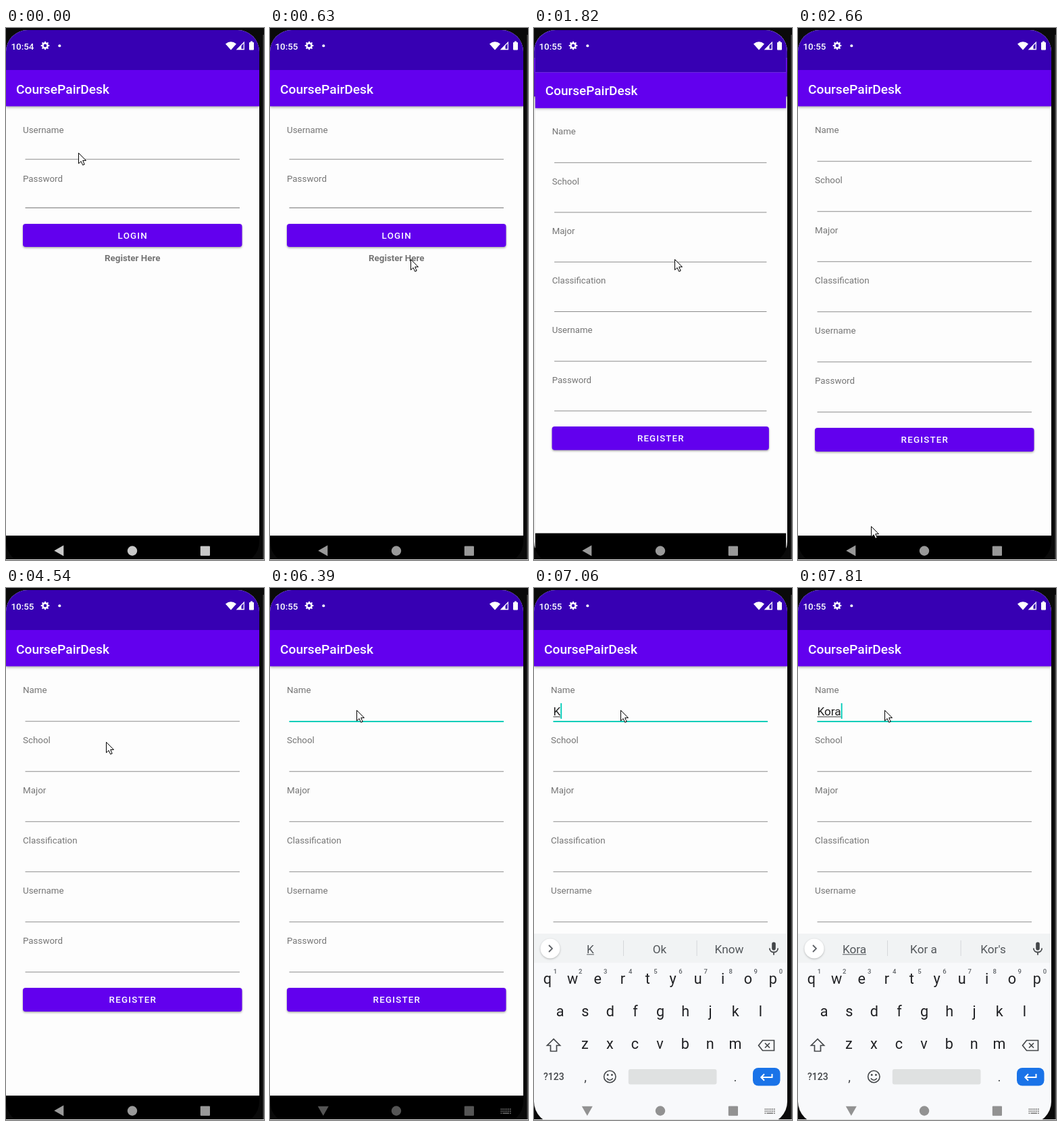
Write an HTML page with a canvas that moves like this. It is 382x785 px and loops after 8000 ms.

```html
<!DOCTYPE html>
<html lang="en">
<head>
<meta charset="utf-8">
<title>Sign-up screen</title>
<style>
html, body { margin: 0; width: 100%; height: 100%; overflow: hidden; background: #000; }
canvas { display: block; width: 382px; height: 785px; }
</style>
</head>
<body>
<canvas id="stage"></canvas>
<script>
const W = 382, H = 785, LOOP = 8000, TEAL = '#03cdb9', GREY = '#757575';
const dpr = window.devicePixelRatio || 1;

function setUp(canvas) {
  canvas.width = W * dpr;
  canvas.height = H * dpr;
  return canvas.getContext('2d');
}
const main = setUp(document.getElementById('stage'));
const layer = setUp(document.createElement('canvas'));
let c = main; // context the helpers draw on

// Stepped tracks: [time, ...values]; the last entry reached is in force.
const POINTER = [
  [0, 107.5, 184], [120, 116, 196], [240, 146, 243], [360, 184, 299], [480, 202, 324],
  [630, 208.5, 341], [1970, 209, 359], [2130, 226, 492], [2250, 240, 607],
  [2400, 239, 634], [2520, 237, 651], [2660, 108.5, 735], [2810, 82, 739],
  [3110, 78, 744], [3230, 73, 757], [3360, 69, 770], [3480, 67, 779],
  [3740, 72, 779], [3880, 77, 774], [4030, 104, 690], [4150, 160, 500],
  [4270, 202, 354], [4540, 148.5, 227], [4690, 122, 165], [4810, 114, 141], [4960, 128.5, 180]
];
const NAV = [[0, '#c8c8c8'], [240, '#b0b0b0'], [480, '#999'], [5960, '#707070'],
  [6390, '#555'], [6640, '#666'], [6790, '#929292']];
const TYPED = [[0, ''], [6640, 'K'], [7310, 'Ko'], [7430, 'Kor'], [7550, 'Kora']];
const HINTS = [[0], [6940, 'K', 'Ok', 'Know'], [7430, 'Ko', 'Know', 'Koi'],
  [7550, 'Kor', 'Kor a', 'For'], [7810, 'Kora', 'Kor a', "Kor's"]];
const BOARD = [[0, 0, 0], [6520, 0.4, 36], [6640, 0.8, 16], [6790, 1, 0]];
const at = (track, t) => track.filter(k => k[0] <= t).pop().slice(1);

function rect(x, y, w, h, color, r = 0) {
  c.fillStyle = color;
  c.beginPath();
  c.roundRect(x, y, w, h, r);
  c.fill();
}

function disc(x, y, r, color) {
  c.fillStyle = color;
  c.beginPath();
  c.arc(x, y, r, 0, 7);
  c.fill();
}

function poly(points, color) {
  c.fillStyle = color;
  c.beginPath();
  for (let i = 0; i < points.length; i += 2) c.lineTo(points[i], points[i + 1]);
  c.closePath();
  c.fill();
}

function line(path, color, width = 1.8) {
  c.strokeStyle = color;
  c.lineWidth = width;
  c.stroke(new Path2D(path));
}

function text(str, x, y, size, color, { weight = 400, align = 'left', gap = 0 } = {}) {
  c.font = `${weight} ${size}px Roboto, sans-serif`;
  c.textAlign = align;
  c.letterSpacing = gap + 'px';
  c.fillStyle = color;
  c.fillText(str, x, y);
  return c.measureText(str).width;
}

function shadowed(draw, blur, dy, alpha) {
  c.save();
  c.shadowColor = `rgba(0,0,0,${alpha})`;
  c.shadowBlur = blur * dpr;
  c.shadowOffsetY = dy * dpr;
  draw();
  c.restore();
}

function gear(x, y, r, color) {
  c.fillStyle = color;
  c.beginPath();
  for (let i = 0; i < 32; i++) {
    const a = (i - 0.5) * Math.PI / 16, q = i % 4 < 2 ? r : r * 0.74;
    c.lineTo(x + q * Math.cos(a), y + q * Math.sin(a));
  }
  c.closePath();
  c.moveTo(x + r * 0.36, y);
  c.arc(x, y, r * 0.36, 0, 7);
  c.fill('evenodd');
}

function field(label, y, lineY, focused) {
  text(label, 25, y, 13.37, GREY);
  if (focused) rect(28.5, lineY - 0.2, 317.5, 1.9, TEAL);
  else rect(28.5, lineY, 317.5, 1.1, '#8c8c8c');
}

function button(label, y, h) {
  shadowed(() => rect(25, y, 324.5, h, '#6200ee', 4), 3, 1.5, 0.35);
  text(label, 187.8, y + h / 2 + 4.9, 13.37, '#fff', { weight: 500, align: 'center', gap: 1.19 });
}

function typedText(t) {
  const [word] = at(TYPED, t), [under = ''] = at(HINTS, t);
  const w = text(word, 28.5, 188, 17.2, '#212121');
  if (under) rect(28.5, 189.6, c.measureText(under).width, 1, '#333');
  if (t >= 5530 && t < 6100 || t >= 6520) rect(28.5 + w, 170, 1.9, 23, TEAL);
}

// One app window, scaled about the middle of the screen.
function page(name, scale, t) {
  c.save();
  c.translate(187.5, 393);
  c.scale(scale, scale);
  c.translate(-187.5, -393);
  rect(0, 0, 375, 749, '#fdfdfd');
  shadowed(() => rect(0, 62, 375, 53.5, '#6200ee'), 4, 1, 0.35);
  rect(0, 0, 375, 62, '#3700b3');
  text('CoursePairDesk', 15, 96.5, 19.2, '#fff', { weight: 500 });
  rect(0, 749, 375, 44, '#000');
  if (name === 'login') {
    field('Username', 155, 193.2);
    field('Password', 226.5, 264.8);
    button('LOGIN', 289, 34);
    text('Register Here', 187.2, 343.5, 13.37, GREY, { weight: 700, align: 'center' });
  } else {
    ['Name', 'School', 'Major', 'Classification', 'Username', 'Password'].forEach((label, i) =>
      field(label, 155 + 74 * i, 196.2 + 74 * i, !i && t >= 5380));
    button('REGISTER', 590, 35);
    typedText(t);
  }
  c.restore();
}

function pages(t) {
  if (t < 1700) return page('login', 1, t);
  if (t < 1970) {
    const [next, prev] = t < 1820 ? [0.9676, 1.039] : [0.99, 1.052];
    page('login', prev, t);
    rect(0, 0, 375, H, 'rgba(0,0,0,.07)');
    return page('register', next, t);
  }
  page('register', 1, t);
}

function statusBar(t) {
  text(t < 240 ? '10:54' : '10:55', 7.5, 31.5, 13.37, '#fff', { weight: 500 });
  gear(58, 26, 6.4, '#fff');
  disc(79.3, 26.2, 2, '#fff');
  c.fillStyle = '#fff';
  c.fill(new Path2D('M325 23.5Q333 17 341 23.5L333 32.5Z'));
  line('M342.3 31.5L352.3 21.3V31.5Z', '#fff', 1.3);
  poly([342, 32, 348.5, 25.5, 348.5, 32], '#fff');
  rect(360, 21, 7, 11.5, '#fff', 1);
  rect(362, 19.6, 3, 2, '#fff');
}

function navBar(t) {
  const [color] = at(NAV, t), typing = t >= 5960;
  c.save();
  c.translate(78.8, 771.3);
  c.rotate(t >= 6100 ? -Math.PI / 2 : typing ? -Math.PI / 4 : 0);
  poly([-7.5, 0, 6.5, -8, 6.5, 8], color);
  c.restore();
  disc(187, 771.5, 7.2, color);
  rect(287.8, 764.5, 14.2, 14.2, color, 1);
  if (!typing) return;
  for (let i = 0; i < 6; i++)
    for (let j = 0; j < 2; j++) rect(341.5 + i * 2.7, 768 + j * 3, 1.8, 2, color);
  rect(341.5, 774, 1.8, 2, color);
  rect(344.5, 774, 9.5, 2, color);
  rect(355, 774, 1.8, 2, color);
}

function toolIcons() {
  const ink = '#5f6368';
  line('M67 524.5H79Q80.5 524.5 80.5 526V534L75.5 539H67Q65.5 539 65.5 537.5V526Q65.5 524.5 67 524.5ZM80 533.5H75V539M69 532Q71 536 74 533.5', ink, 1.7);
  disc(70, 529.5, 1.2, ink);
  disc(76, 529.5, 1.2, ink);
  text('GIF', 126, 536, 13, ink, { weight: 900, align: 'center' });
  gear(181, 531.5, 8.6, ink);
  disc(235, 531.5, 8.4, ink);
  [[230, 532], [232, 527.5], [237.5, 527.5], [240, 531.5]].forEach(([x, y]) => disc(x, y, 1.4, '#f1f3f4'));
  disc(239.5, 538.2, 3, '#f1f3f4');
  rect(267.3, 521, 1, 22, '#d5d7da');
  for (let i = 0; i < 3; i++) disc(295.3 + i * 6, 531.5, 1.9, ink);
}

function hintRow(words) {
  words.forEach((word, i) => {
    const x = [83.5, 186, 289][i];
    const w = text(word, x, 538.5, 17.2, '#53575b', { align: 'center' });
    if (!i) rect(x - w / 2, 540.3, w, 1, '#53575b');
    else rect(i * 108.6 + 23.4, 520, 1, 23, '#d5d7da');
  });
}

function keyRow(keys, x, y) {
  [...keys].forEach((key, i) => text(key, x + 37.1 * i, y, 21.6, '#202124', { align: 'center' }));
}

function board(words) {
  const ink = '#44474a';
  rect(0, 510, 375, 280, '#f8f9fb');
  rect(0, 510, 375, 43, '#f1f3f4');
  shadowed(() => disc(24, 532, 14.5, '#fff'), 3, 1, 0.25);
  line(words.length ? 'M22 527L27 532L22 537' : 'M26 527L21 532L26 537', '#5f6368');
  words.length ? hintRow(words) : toolIcons();
  rect(352.2, 522.5, 5.6, 12, ink, 2.8);
  line('M348.8 531.5C349 539.5 361 539.5 361.2 531.5M355 537V541.5', ink);

  keyRow('qwertyuiop', 20, 584.3);
  keyRow('asdfghjkl', 38.6, 632.3);
  keyRow('zxcvbnm', 75.3, 680.3);
  [...'1234567890'].forEach((n, i) =>
    text(n, 31.5 + 37.1 * i, 569.3, 9.5, '#5f6368', { weight: 500, align: 'center' }));
  line('M29 665.5L19.5 675H24.5V683.5H33.5V675H38.5Z', ink, 1.7);
  line('M338.5 667.5H355.5V682.5H338.5L332.5 675ZM342 671.5L349 678.5M349 671.5L342 678.5', ink, 1.7);
  text('?123', 29.3, 726, 14, ink, { weight: 500, align: 'center' });
  text(',', 76, 728, 19, ink, { align: 'center' });
  line('M121 721A8.7 8.7 0 1 1 103.6 721A8.7 8.7 0 1 1 121 721M107.8 723.5Q112.3 729 116.8 723.5', ink, 1.6);
  disc(109.2, 718.5, 1.4, ink);
  disc(115.4, 718.5, 1.4, ink);
  rect(139.8, 710, 130.7, 22.5, '#dfe1e1', 3);
  text('.', 298, 728, 19, ink, { align: 'center' });
  rect(324, 708, 40.5, 26.5, '#1a73e8', 8);
  line('M352.5 717V722H336.5M341 717.3L336.3 722L341 726.7', '#fff', 2);
}

// The board fades in as one layer over the page.
function keyboard(t) {
  const [alpha, dy] = at(BOARD, t);
  if (!alpha) return;
  c = layer;
  c.setTransform(dpr, 0, 0, dpr, 0, 0);
  c.clearRect(0, 0, W, H);
  c.translate(0, dy);
  board(at(HINTS, t));
  c = main;
  c.globalAlpha = alpha;
  c.drawImage(layer.canvas, 0, 0, W, H);
  c.globalAlpha = 1;
}

function pointer(x, y) {
  c.save();
  c.translate(x, y);
  const arrow = 'M0 .5V16L3.6 12.7L6.2 18.3L8.7 17.2L6.2 11.6H11Z';
  c.fillStyle = '#fff';
  c.fill(new Path2D(arrow));
  line(arrow, '#000', 1);
  c.restore();
}

function frame(now) {
  const t = now % LOOP;
  c.setTransform(dpr, 0, 0, dpr, 0, 0);
  rect(0, 0, W, H, '#0a0a0a');
  rect(380.5, 10, 1.5, 774, '#484848');
  c.save();
  c.beginPath();
  c.roundRect(0, 3, 375, 787, 32);
  c.clip();
  pages(t);
  statusBar(t);
  keyboard(t);
  navBar(t);
  c.restore();
  rect(0, 784, W, 1, '#dedede');
  pointer(...at(POINTER, t));
  requestAnimationFrame(frame);
}
requestAnimationFrame(frame);
</script>
</body>
</html>
```
